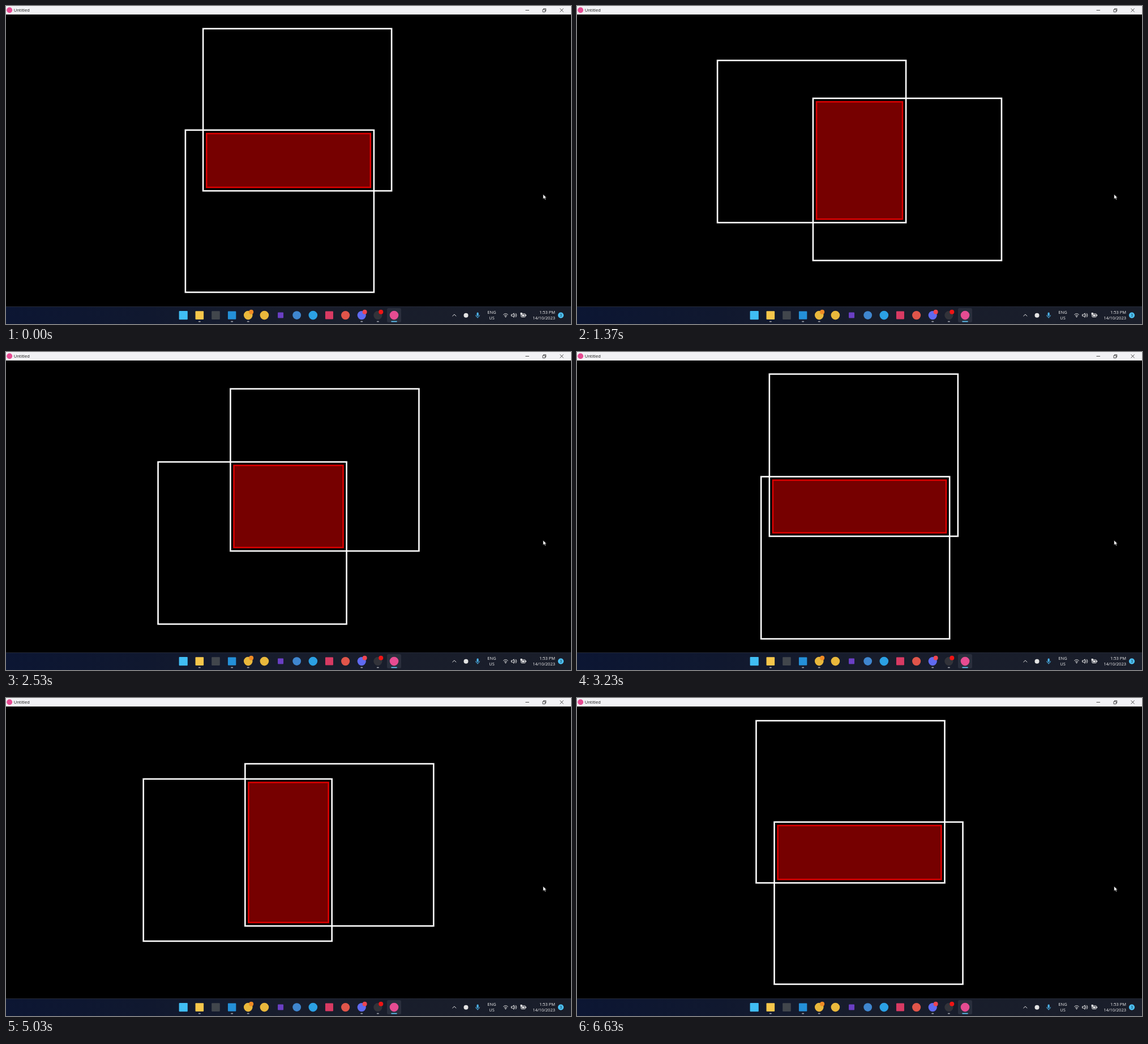
An HTML page for the animation above (6660 ms loop, 998 by 561 pixels).

```html
<!DOCTYPE html>
<html lang="en">
<head>
<meta charset="utf-8">
<title>Untitled</title>
<style>
  html, body { margin: 0; width: 100%; height: 100%; overflow: hidden; background: #000; }
  svg { display: block; width: 998px; height: 561px; }
  text { font: 7.5px "Open Sans", "Noto Sans", sans-serif; }
  .thin { fill: none; stroke: #222; stroke-width: .8; }
  .tray { fill: none; stroke: #eee; stroke-width: 1; stroke-linecap: round; }
  .light { fill: #f2f2f2; }
  .box { fill: none; stroke: #fff; stroke-width: 2.6; }
  #overlap { fill: #760000; stroke: #dc0000; stroke-width: 2.6; }
</style>
</head>
<body>
<svg viewBox="0 0 998 561">
  <defs>
    <linearGradient id="bar">
      <stop offset="0" stop-color="#0c1633"/>
      <stop offset=".25" stop-color="#10182f"/>
      <stop offset=".5" stop-color="#181d2c"/>
      <stop offset="1" stop-color="#1a1e2a"/>
    </linearGradient>
  </defs>
  <rect width="998" height="561"/>

  <rect id="overlap"/>
  <rect class="box"/>
  <rect class="box"/>

  <!-- title bar -->
  <rect width="998" height="15" fill="#f2f2f5"/>
  <circle cx="6.2" cy="7.3" r="5" fill="#e64c92"/>
  <text x="13.8" y="10.3" fill="#111">Untitled</text>
  <path class="thin" d="M917.5 7.5h6.5M948 6.2h4.3v4.3h-4.3zM949.5 6v-1.3h4.2v4.3h-1.2M978.6 4.4l6 6m0-6l-6 6"/>

  <!-- taskbar -->
  <rect y="530" width="998" height="31" fill="url(#bar)"/>
  <rect y="530" width="998" height="1" fill="#252a38"/>
  <rect x="673" y="533" width="25" height="25" rx="2.5" fill="#2a2f3d"/>
  <g id="apps"></g>

  <!-- tray -->
  <path class="tray" d="M788.8 547l3-3 3 3"/>
  <circle cx="812.5" cy="545.7" r="4" fill="#e4e4e4"/>
  <rect x="831.5" y="540.5" width="3.2" height="6.4" rx="1.6" fill="#4cb4ec"/>
  <path class="tray" style="stroke:#4cb4ec" d="M829.8 545.5a3.3 3.3 0 0 0 6.6 0M833.1 549v1.3"/>
  <g class="light" text-anchor="middle">
    <text x="858" y="543.2">ENG</text>
    <text x="858" y="553.4">US</text>
  </g>
  <path class="tray" d="M878.7 544.4q3.8-3.4 7.6 0M880.4 546.4q2.1-1.9 4.2 0"/>
  <circle class="light" cx="882.5" cy="548.3" r="1"/>
  <path class="tray" d="M893 544.2h1.7l2.5-2.3v7.4l-2.5-2.3h-1.7zM899 544q1.3 1.6 0 3.2M900.5 542.4q2.8 3.2 0 6.4"/>
  <rect class="tray" x="909.8" y="543" width="7.6" height="5.6" rx="1"/>
  <path class="light" d="M911.2 544.4h4.9v2.9h-4.9zM918 544.5h1v2.6h-1zM908.7 541h3v3.6h-3z"/>
  <g class="light" text-anchor="end">
    <text x="970" y="543.2">1:53 PM</text>
    <text x="970" y="553.4">14/10/2023</text>
  </g>
  <circle cx="980" cy="545.6" r="5.1" fill="#4cc2f5"/>
  <text x="980" y="548" text-anchor="middle" fill="#10202c" style="font-size:6.5px">3</text>

  <path d="M948.7 332.2v8.4l2-1.8 1.4 2.9 1.4-.7-1.4-2.8h2.6z" fill="#fff" stroke="#000" stroke-width=".5"/>
</svg>
<script>
const LOOP = 6660, FPS = 30;
const CENTER = { x: 499, y: 272.5 }, RADIUS = 90.8, START = 80.1 * Math.PI / 180;
const W = 333, H = 286.1, INSET = 6.1;

const make = (parent, tag, attrs) => {
  const el = document.createElementNS('http://www.w3.org/2000/svg', tag);
  for (const key in attrs) el.setAttribute(key, attrs[key]);
  parent.append(el);
};

// shape, colour, half size, indicator, badge colour
const APPS = [
  ['rect', '#40bdf3', 7.6], ['rect', '#f6c64b', 7.3, 1], ['rect', '#41464c', 7.3],
  ['rect', '#2490d8', 7.2, 1], ['circle', '#e9b83c', 7.8, 1, '#f08a24'], ['circle', '#e9b83c', 7.8],
  ['rect', '#6a3fc4', 5], ['circle', '#3f86cf', 7.4], ['circle', '#2ba0e4', 7.8],
  ['rect', '#d83a63', 7], ['circle', '#e0554a', 7.6], ['circle', '#5f6af0', 7.6, 1, '#ee4550'],
  ['circle', '#32333a', 7.6, 1, '#f01414'], ['circle', '#e64c92', 7.8, 2]
];
const apps = document.getElementById('apps');
APPS.forEach(([shape, fill, r, mark, badge], i) => {
  const cx = 313.2 + i * 28.64, cy = 545.6;
  make(apps, shape, shape === 'circle'
    ? { cx, cy, r, fill }
    : { x: cx - r, y: cy - r, width: 2 * r, height: 2 * r, rx: 1, fill });
  if (badge) make(apps, 'circle', { cx: cx + 5.4, cy: cy - 5.8, r: 4, fill: badge });
  if (mark) {
    const width = mark === 2 ? 10.5 : 4;
    make(apps, 'rect', {
      x: cx - width / 2, y: 555.8, width, height: 1.7, rx: .8,
      fill: mark === 2 ? '#5cc4f4' : '#9a9da5'
    });
  }
});

const overlap = document.getElementById('overlap');
const boxes = document.querySelectorAll('.box');

function place(el, x, y, width, height) {
  const attrs = { x, y, width, height };
  for (const key in attrs) el.setAttribute(key, attrs[key].toFixed(2));
}

function draw() {
  const ticks = Math.floor(performance.now() % LOOP / 10);
  const step = Math.floor((ticks + .5) * FPS / 100);
  const angle = START + step / FPS;
  const dx = RADIUS * Math.cos(angle), dy = -RADIUS * Math.sin(angle);

  [1, -1].forEach((side, i) =>
    place(boxes[i], CENTER.x + side * dx - W / 2, CENTER.y + side * dy - H / 2, W, H));

  const w = W - 2 * Math.abs(dx) - 2 * INSET;
  const h = H - 2 * Math.abs(dy) - 2 * INSET;
  place(overlap, CENTER.x - w / 2, CENTER.y - h / 2, w, h);
  requestAnimationFrame(draw);
}
draw();
</script>
</body>
</html>
```
